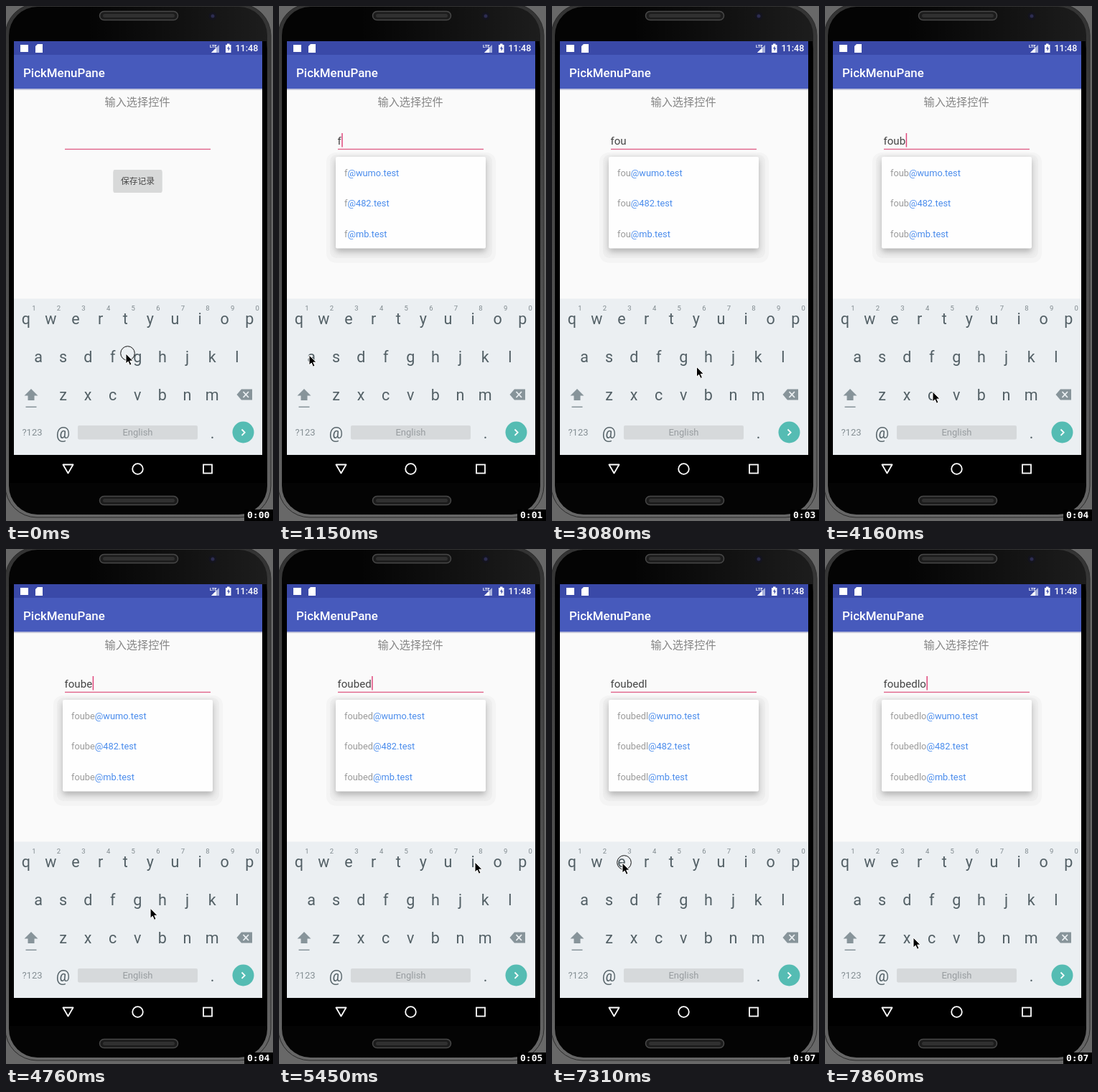
Write an HTML page that moves like this. It is 372x717 px and loops after 8 s.

```html
<!DOCTYPE html>
<html lang="zh">
<head>
<meta charset="utf-8">
<title>Input suggestions</title>
<style>
html, body { margin: 0; width: 100%; height: 100%; overflow: hidden; background: #555; }
svg { display: block; width: 372px; height: 717px; }
text { font-family: Roboto, "Noto Sans CJK SC", "Noto Sans CJK", sans-serif; white-space: pre; }
.mid { text-anchor: middle; }
.key { font-size: 21.5px; fill: #536066; }
.digit { font-size: 9.5px; fill: #7f898e; }
.hint { font-size: 13px; fill: #858f94; }
.mail { font-size: 12.8px; fill: #9b9b9b; }
.mail .host { fill: #4a8cec; }
.line { fill: none; stroke: #fff; stroke-width: 1.8; }
.timer { font: bold 13px "DejaVu Sans Mono", "Liberation Mono", monospace; fill: #fff; }
</style>
</head>
<body>
<svg viewBox="0 0 372 717">
  <defs>
    <linearGradient id="rim" x2="0" y2="1">
      <stop offset="0" stop-color="#333"/>
      <stop offset=".5" stop-color="#4c4c4c"/>
      <stop offset="1" stop-color="#666"/>
    </linearGradient>
    <linearGradient id="glare">
      <stop offset=".3" stop-color="#fff" stop-opacity="0"/>
      <stop offset="1" stop-color="#fff" stop-opacity=".1"/>
    </linearGradient>
    <filter id="soft" x="-20%" y="-20%" width="140%" height="150%"><feGaussianBlur stdDeviation="4"/></filter>
    <g id="grille">
      <rect x="130.5" width="109" height="12" rx="6" fill="#1c1c1c" stroke="#484848" stroke-width="1.5"/>
      <rect x="135" y="3.5" width="100" height="5" rx="2.5" fill="#303030"/>
    </g>
  </defs>

  <!-- phone -->
  <rect width="372" height="717" fill="#686868"/>
  <rect x="-1" y="-3" width="370" height="715" rx="44" fill="url(#rim)" stroke="#2a2a2a"/>
  <rect x="4" y="1" width="360" height="707" rx="40" fill="#040404"/>
  <rect x="4" y="1" width="360" height="90" rx="40" fill="url(#glare)"/>
  <rect x="5" y="49" width="358" height="615" fill="#000"/>
  <use href="#grille" y="7.5"/>
  <use href="#grille" y="682.5"/>
  <circle cx="288" cy="14" r="5.5" fill="#14141e"/>
  <circle cx="288" cy="14" r="2.5" fill="#2c2c50"/>

  <!-- page -->
  <rect x="11" y="115" width="346" height="293" fill="#fafafa"/>
  <rect x="11" y="49" width="346" height="19.5" fill="#3a49a8"/>
  <rect x="11" y="68" width="346" height="47.500" fill="#475abc"/>
  <rect x="11" y="115.500" width="346" height="1.500" fill="#c9cada"/>
  <rect x="20" y="54" width="11" height="10" fill="#fff"/>
  <path d="M44 53h7v12H41v-9z" fill="#fff"/>
  <text x="284" y="58" font-size="6" font-weight="700" fill="#fff">LTE</text>
  <path d="M286 65l11-11v11z" fill="#a9b2dc"/>
  <path d="M286 65l7-7v7z" fill="#fff"/>
  <path d="M306 54h2v-1.5h3.500v1.500h2v11h-7.500z" fill="#fff"/>
  <path d="M310.500 55.500l-2.500 4h1.700v3.500l2.400-4.500h-1.600z" fill="#3a49a8"/>
  <text x="319.500" y="63" font-size="12.500" font-weight="500" fill="#fff">11:48</text>
  <text x="24" y="98.500" font-size="16.900" font-weight="500" fill="#fff">PickMenuPane</text>
  <text class="mid" x="183" y="138.500" font-size="15.200" fill="#858585">输入选择控件</text>
  <rect x="149.500" y="229.500" width="68" height="30.500" rx="2" fill="#c4c4c4" opacity=".6"/>
  <rect x="149.500" y="228" width="68" height="30.500" rx="2" fill="#d8d9d9"/>
  <text class="mid" x="183.500" y="248" font-size="11.800" fill="#484848">保存记录</text>
  <rect x="82" y="198.700" width="203" height="1.400" fill="#e0648a"/>
  <text id="field" x="81.500" y="193" font-size="15.100" fill="#444"></text>
  <rect id="caret" y="177" width="1.500" height="19.500" fill="#e0487c"/>

  <!-- suggestions -->
  <g id="popup">
    <rect x="66" y="204" width="236" height="153.500" rx="13" fill="#f4f4f4"/>
    <rect x="71" y="207" width="226" height="144" rx="9" fill="#eee"/>
    <rect x="79" y="214" width="209" height="128" rx="3" fill="#8a8a8a" opacity=".6" filter="url(#soft)"/>
    <rect x="79" y="210" width="209" height="127.500" rx="2" fill="#fefefe"/>
  </g>

  <!-- keyboard -->
  <rect x="11" y="407.500" width="346" height="217.500" fill="#ebeff2"/>
  <g id="keys"></g>
  <path d="M35 533l9.500 9.500h-5v6.500h-9v-6.500h-5z" fill="#87949a"/>
  <rect x="27.500" y="557.500" width="15" height="1.500" fill="#87949a"/>
  <path d="M328 533.500h15v15h-15l-6.500-7.500z" fill="#87949a"/>
  <path d="M330.500 537l7.500 8m0-8l-7.500 8" stroke="#ebeff2" stroke-width="1.800"/>
  <text class="hint mid" x="36.500" y="598">?123</text>
  <rect x="100" y="584" width="167" height="19.500" rx="2" fill="#d6d9db"/>
  <text class="mid" x="183.500" y="598" font-size="13" fill="#989da0">English</text>
  <circle cx="330.500" cy="593.500" r="15" fill="#55bcb3"/>
  <path class="line" d="M328.500 589.500l4.200 4.200l-4.200 4.200"/>

  <!-- navigation -->
  <path class="line" d="M79.500 638.500h14l-7 12z" stroke-linejoin="round"/>
  <circle class="line" cx="183.500" cy="644.500" r="7.300"/>
  <rect class="line" x="275" y="638.500" width="12" height="12"/>

  <g id="pointer">
    <circle id="press" cx="2.500" cy="-.5" r="9.800" fill="none" stroke="#111"/>
    <path d="M0 0v14l3.200-3l2.300 5.200l2.500-1.100l-2.300-5h4.300z" fill="#000" stroke="#fff" stroke-width="1"/>
  </g>

  <rect x="332" y="701" width="40" height="16" fill="#000"/>
  <text id="timer" class="timer" x="336" y="713"></text>
</svg>

<script>
const LOOP = 8000;
const WORD = "foubedlo";
const HOSTS = ["@wumo.test", "@482.test", "@mb.test"];

// start, end and count of evenly spaced screen updates
const RUNS = [
  [150, 300, 2], [600, 1590, 8], [1740, 2040, 3], [2340, 3330, 8], [3470, 4460, 8],
  [4610, 5590, 8], [5740, 6720, 8], [6870, 7010, 2], [7310, 7860, 5]
];
const STEPS = [0].concat(...RUNS.map(([a, b, n]) =>
  Array.from({ length: n }, (_, i) => a + (b - a) * i / (n - 1))));

const FOCUS = 150;
const TYPED = [740, 1440, 2470, 3740, 4440, 5020, 5730, 7440];
const PRESSES = [0, 600, 1300, 2340, 3610, 4310, 4890, 5590, 7310];

// time, x, y of the pointer tip
const PATH = [
  [0, 167, 484], [300, 167, 436], [740, 167, 436], [1150, 42, 486], [1310, 42, 486],
  [2040, 253, 542], [2490, 253, 542], [3330, 183, 488], [3760, 183, 488],
  [4160, 150, 537], [4460, 150, 537], [4890, 218, 488], [5030, 218, 488],
  [5450, 273, 436], [5740, 273, 436], [6430, 140, 436], [6870, 98, 437],
  [7450, 98, 437], [7860, 123, 541], [8000, 123, 541]
];

const $ = id => document.getElementById(id);
const [field, caret, popup, pointer, press, timer] =
  ["field", "caret", "popup", "pointer", "press", "timer"].map($);

function addText(parent, cls, x, y, str = "", tag = "text") {
  const el = document.createElementNS("http://www.w3.org/2000/svg", tag);
  el.setAttribute("class", cls);
  if (x !== null) {
    el.setAttribute("x", x);
    el.setAttribute("y", y);
  }
  el.textContent = str;
  return parent.appendChild(el);
}

const PITCH = 34.6;
[["qwertyuiop", 27.8, 443], ["asdfghjkl", 45, 496], ["zxcvbnm", 79.5, 549]].forEach(([row, x, y]) =>
  [...row].forEach((c, i) => addText($("keys"), "key mid", x + i * PITCH, y, c)));
[..."1234567890"].forEach((c, i) => addText($("keys"), "digit mid", 38.8 + i * PITCH, 424, c));
addText($("keys"), "key mid", 79.5, 601.5, "@");
addText($("keys"), "key mid", 287.5, 601.5, ".");

const names = HOSTS.map((host, i) => {
  const line = addText(popup, "mail", 91, 236.5 + i * 42.6);
  const name = addText(line, "name", null, null, "", "tspan");
  addText(line, "host", null, null, host, "tspan");
  return name;
});

const show = (el, on) => el.setAttribute("visibility", on ? "visible" : "hidden");

function pointerAt(t) {
  const i = Math.max(1, PATH.findIndex(p => p[0] > t));
  const [t0, x0, y0] = PATH[i - 1], [t1, x1, y1] = PATH[i];
  const u = Math.min(1, (t - t0) / (t1 - t0));
  const e = u * u * (3 - 2 * u);
  return [x0 + (x1 - x0) * e, y0 + (y1 - y0) * e];
}

function draw(time) {
  const t = STEPS.filter(s => s <= time + 20).pop();
  const count = TYPED.filter(s => s <= t).length;
  const word = WORD.slice(0, count);
  const since = t - (count ? TYPED[count - 1] : FOCUS);

  field.textContent = word;
  names.forEach(n => { n.textContent = word; });
  show(popup, count > 0);
  caret.setAttribute("x", 82 + (count ? field.getComputedTextLength() : 0));
  show(caret, since >= 0 && since % 1000 < 500);

  pointer.setAttribute("transform", `translate(${pointerAt(t)})`);
  show(press, PRESSES.some(p => t >= p && t < p + 130));
  timer.textContent = "0:0" + Math.max(0, Math.floor((t - 20) / 1000));
}

const start = performance.now();
function tick() {
  draw((performance.now() - start) % LOOP);
  requestAnimationFrame(tick);
}
tick();
</script>
</body>
</html>
```
